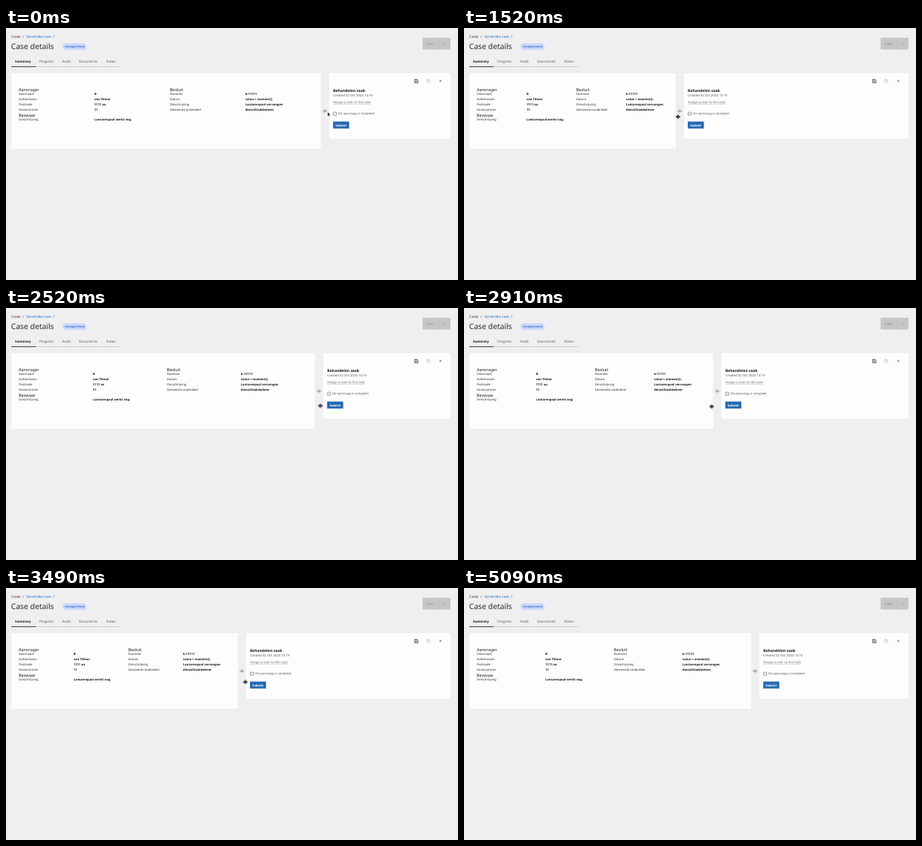
These frames come from a looping animation (600x335 px, 5120 ms). An HTML page:

```html
<!DOCTYPE html>
<html lang="nl">
<head>
<meta charset="utf-8">
<title>Case details</title>
<style>
  html, body { margin: 0; width: 100%; height: 100%; overflow: hidden; background: #efefef; }
  svg { display: block; width: 600px; height: 335px; }
  text { font-family: "Noto Sans", "Open Sans", sans-serif; font-size: 4.15px; fill: #2b2b2b; text-rendering: geometricPrecision; white-space: pre; }
  .nav { font-size: 4.6px; }
  .tab { font-size: 4.55px; fill: #5a5a5a; }
  .head { font-size: 5.55px; fill: #1c1c1c; }
  .val { font-size: 4.05px; font-weight: 700; fill: #161616; }
  .line { fill: none; stroke: #333; stroke-width: .6; }
</style>
</head>
<body>
<svg viewBox="0 0 600 335">
  <text class="nav" x="7" y="13">Cases</text>
  <text class="nav" x="22" y="13">/</text>
  <text class="nav" x="27" y="13" style="fill:#1f70c1">Generieke zaak</text>
  <text class="nav" x="62.5" y="13">/</text>
  <text x="6.7" y="27.7" style="font-size:10.2px">Case details</text>
  <rect x="75" y="20.6" width="32" height="8.4" rx="4.2" fill="#c8d8f8"/>
  <text x="78" y="26.3" style="font-size:4px;fill:#1a4fc4">Geregistreerd</text>

  <rect x="553" y="13" width="37" height="15.6" fill="#c6c6c6"/>
  <text x="558" y="22.6" style="font-size:4.9px;fill:#929292">Start</text>
  <path d="M574.3 13v15.6" stroke="#b8b8b8" stroke-width=".5"/>
  <path class="line" d="M580.4 20.2l1.6 1.6 1.6-1.6" style="stroke:#8d8d8d"/>

  <text class="tab" x="12" y="46.4" style="font-size:4.4px;font-weight:700;fill:#161616">Summary</text>
  <text class="tab" x="44.3" y="46.4">Progress</text>
  <text class="tab" x="74.5" y="46.4">Audit</text>
  <text class="tab" x="97" y="46.4">Documents</text>
  <text class="tab" x="133" y="46.4">Notes</text>
  <path d="M7 51.4h144" stroke="#c4c4c4" stroke-width=".8"/>
  <path d="M7 51.4h32.5" stroke="#303030" stroke-width=".9"/>

  <rect id="left" x="7" y="60" height="100.5" fill="#fdfdfd"/>
  <g id="cols"></g>

  <rect id="right" y="60" height="87" fill="#fdfdfd"/>
  <g id="task">
    <text class="val" y="84.9" style="font-size:5px">Behandelen zaak</text>
    <text y="91" style="font-size:4.25px;fill:#555">Created 02 Oct 2024 13:19</text>
    <text y="100.3" style="font-size:4.3px;fill:#6f6f6f">Assign a user to this task</text>
    <path d="M0 101.2h50" stroke="#8a8a8a" stroke-width=".4"/>
    <rect class="line" x=".5" y="112" width="4" height="4" rx=".4" style="stroke-width:.5"/>
    <text x="7" y="114.7" style="fill:#555">De aanvraag is compleet</text>
    <rect y="124.4" width="21.3" height="9.2" fill="#2467b0"/>
    <text class="val" x="3.1" y="130.5" style="font-size:4.2px;fill:#fff">Submit</text>
  </g>

  <path class="line" d="M542.4 68.2h3.4l1.2 1.2v3.6h-4.6zM543.6 68.2v1.5h2v-1.5M543.4 73v-1.8h2.6v1.8"/>
  <g class="line" style="stroke:#9a9a9a;stroke-width:.5">
    <path d="M558.7 69.2a2.2 2.2 0 1 1-.3 1.6M558.5 67.9v1.5h1.5M560.6 69.4v1.2l.8.7"/>
  </g>
  <path class="line" d="M575.2 69l2.8 2.8m0-2.8l-2.8 2.8"/>

  <path id="handle" d="M-.7-2.3v4.6M.7-2.3v4.6M-2.6 0h5.2M-1.8-.9l-.9.9.9.9M1.8-.9l.9.9-.9.9" fill="none" stroke="#888" stroke-width=".6"/>
  <path id="arrow" d="M0 0v5l1.2-1.1.8 1.9 .8-.4-.8-1.8h1.6z" fill="#111" stroke="#fff" stroke-width=".25"/>
  <path id="resize" d="M-.6-2.6v5.2M.6-2.6v5.2M-2.4 0h4.8M-1.8-1.1l-1.1 1.1 1.1 1.1M1.8-1.1l1.1 1.1-1.1 1.1" fill="none" stroke="#111" stroke-width=".9"/>
</svg>
<script>
const LOOP = 5120;
const el = id => document.getElementById(id);
const move = (node, x, y = 0) => node.setAttribute('transform', `translate(${x} ${y})`);

// Four columns: label, value, label, value
const rows = [88.6, 95.6, 102.6, 109.7];
const cols = [
  ['Voornaam', 'Achternaam', 'Postcode', 'Huisnummer', 'Omschrijving'],
  ['B', 'van Tilmor', '1111 aa', '11', 'Lantarenpaal werkt nog'],
  ['Nummer', 'Datum', 'Omschrijving', 'Gemeente onderdeel'],
  ['b-11111', 'value = moment();', 'Lantarenpaal vervangen', 'dienstStadsbeheer']
];
const heads = [[['Aanvrager', 83.7], ['Bezwaar', 118.2]], [], [['Besluit', 83.7]], []];

function addText(parent, str, y, cls) {
  const node = document.createElementNS('http://www.w3.org/2000/svg', 'text');
  node.setAttribute('y', y);
  node.setAttribute('class', cls);
  node.textContent = str;
  parent.append(node);
}
const groups = cols.map((items, i) => {
  const g = document.createElementNS('http://www.w3.org/2000/svg', 'g');
  heads[i].forEach(([str, y]) => addText(g, str, y, 'head'));
  items.forEach((str, r) => addText(g, str, rows[r] ?? 123.2, i % 2 ? 'val' : ''));
  el('cols').append(g);
  return g;
});

// Smooth curve through [time, value] points without overshoot
function track(keys) {
  const rate = i => (keys[i + 1][1] - keys[i][1]) / (keys[i + 1][0] - keys[i][0]);
  const slope = keys.map((_, i) => {
    if (!i || i === keys.length - 1) return 0;
    const a = rate(i - 1), b = rate(i);
    return a * b > 0 ? 2 * a * b / (a + b) : 0;
  });
  return t => {
    if (t <= keys[0][0]) return keys[0][1];
    const i = keys.findIndex(k => k[0] > t) - 1;
    if (i < 0) return keys[keys.length - 1][1];
    const [t0, v0] = keys[i], [t1, v1] = keys[i + 1];
    const d = t1 - t0, u = (t - t0) / d, w = 1 - u;
    return w * w * (1 + 2 * u) * v0 + u * u * (3 - 2 * u) * v1
      + d * u * w * (w * slope[i] - u * slope[i + 1]);
  };
}

const edgeAt = track([[580, 418], [970, 411], [1090, 352], [1300, 305], [1520, 281], [1690, 268],
  [2180, 333], [2520, 410], [2640, 417], [2730, 411], [2910, 331], [3170, 266], [3490, 307.5], [3760, 381]]);
const mouseY = track([[580, 110.2], [970, 110.5], [1520, 118], [2520, 130], [2910, 131], [3200, 137.5],
  [3490, 125], [3760, 118], [4060, 118], [4430, 235], [4580, 235], [4700, 345]]);

function pointer(t) {
  if (t < 240) return [427, 112];
  if (t < 400) return [424.2, 110.5];
  return [edgeAt(t + 22) + (t < 1000 ? 4.8 : 5.3), mouseY(t)];
}

function draw(t) {
  const edge = edgeAt(t);
  el('left').setAttribute('width', edge - 7);
  groups.forEach((g, i) => move(g, 17 + i * (edge - 17) / 4));
  el('right').setAttribute('x', edge + 11);
  el('right').setAttribute('width', 579 - edge);
  move(el('task'), edge + 16.2);
  move(el('handle'), edge + 5.4, 110.4);

  const dragging = t >= 1000 && t < 4060;
  el('arrow').style.display = dragging ? 'none' : '';
  el('resize').style.display = dragging ? '' : 'none';
  move(el(dragging ? 'resize' : 'arrow'), ...pointer(t));
}

const start = performance.now();
function tick() {
  draw((performance.now() - start) % LOOP);
  requestAnimationFrame(tick);
}
tick();
</script>
</body>
</html>
```
